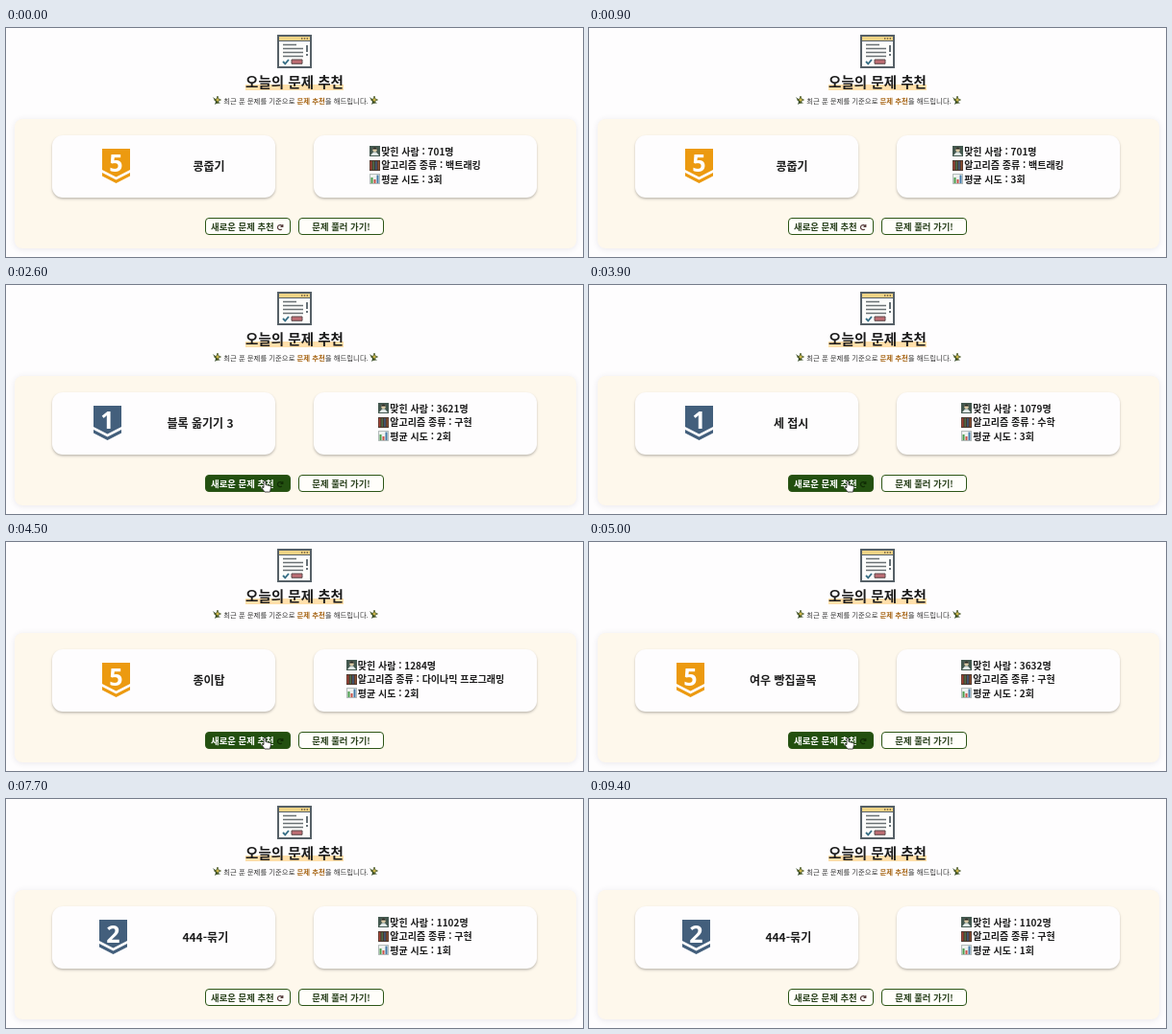
An HTML page that plays this animation: 600x239 px, repeating every 9500 ms.

```html
<!DOCTYPE html>
<html lang="ko">
<head>
<meta charset="utf-8">
<style>
html, body { margin: 0; width: 100%; height: 100%; overflow: hidden; background: #fefdfe; }
body { position: relative; font-family: "Noto Sans CJK KR", "Noto Sans KR", sans-serif; color: #1c1c1c; font-weight: 700; white-space: nowrap; }
body > * { position: absolute; box-sizing: border-box; }
h1 { margin: 0; left: 0; width: 600px; top: 46px; text-align: center; font-size: 14.5px; line-height: 20px; letter-spacing: .05px; }
h1 span { background: linear-gradient(transparent 68%, #ffdfaa 68%, #ffdfaa 97%, transparent 97%); }
#sub { left: 1.5px; width: 600px; top: 70px; text-align: center; font-size: 7.4px; line-height: 11px; font-weight: 500; color: #333; }
#sub b { color: #a9691b; }
#panel { left: 9px; top: 95px; width: 584px; height: 135px; border-radius: 8px; background: #fef8ec; box-shadow: 0 1px 6px rgba(60, 50, 80, .1); }
.card { top: 112px; width: 232px; height: 65px; border-radius: 11px; background: #fefdfe; box-shadow: 0 1.5px 2.5px rgba(0, 0, 0, .25); display: flex; align-items: center; }
#left { left: 48px; padding: 0 20px 2px; justify-content: space-around; font-size: 12px; }
#right { left: 320px; justify-content: center; font-size: 10px; line-height: 14.5px; padding-bottom: 2.5px; }
#right div div { display: flex; align-items: center; }
#right svg { width: 11px; height: 11px; margin-right: 1px; }
.btn { top: 198px; width: 89px; height: 18px; border: 1px solid #2c5516; border-radius: 4px; background: #fffefa; color: #29401c; font-size: 9.4px; line-height: 16px; text-align: center; }
#next { left: 207px; text-align: left; padding-left: 5px; }
#next svg { position: absolute; left: 73px; top: 5px; fill: none; stroke: #553a3a; stroke-width: 1.2; }
#next.hover { background: #235010; color: #fff; }
#next.hover svg { stroke: #102c05; }
#go { left: 304px; }
#pointer { left: 0; top: 0; overflow: visible; fill: #fff; stroke: #222; stroke-width: .8; stroke-linejoin: round; }
</style>
</head>
<body>
<svg style="left:282px;top:7px" width="37" height="36">
  <path d="M1 1H35V34H1Z" fill="#fdfdfb" stroke="#566067" stroke-width="2"/>
  <path d="M2 2H34V6H2Z" fill="#efd385"/>
  <path d="M1 6.5H35" stroke="#566067" stroke-width="1.2"/>
  <path d="M25 4H32" stroke="#6d5a3c" stroke-width="1.4" stroke-dasharray="1.4"/>
  <path d="M6 10.6H20M6 14.6H27M6 18.6H27M6 22.4H27" stroke="#6a7173" stroke-width="1.5"/>
  <path d="M31 11V18M31 20V22" stroke="#4e5a60" stroke-width="1.7"/>
  <path d="M6 28L8.3 30.3L12 26" fill="none" stroke="#386f86" stroke-width="1.9"/>
  <path d="M15 26H26V30.3H15Z" fill="#bd6c72" stroke="#5c4a4c"/>
</svg>
<h1><span>오늘의 문제 추천</span></h1>
<div id="sub">최근 푼 문제를 기준으로 <b>문제 추천</b>을 해드립니다.</div>
<svg style="left:214px;top:71px" width="10" height="10">
  <g id="spark"><path d="M1 1L5 4L9 8L6 7L3 9L4 6Z" fill="#2d4421"/><path d="M6 0L7 3L9.5 4L7 5L6 8L5 5L2.5 4L5 3Z" fill="#c9b44a" stroke="#35491f" stroke-width=".7"/></g>
</svg>
<svg style="left:377px;top:71px" width="10" height="10"><use href="#spark"/></svg>
<div id="panel"></div>
<div class="card" id="left">
  <svg width="29" height="36">
    <path id="badge" d="M0 0H29V22L14.5 29.5L0 22ZM0 25L14.5 32.5L29 25V28.5L14.5 36L0 28.5Z"/>
    <text id="tier" x="14.5" y="23.5" text-anchor="middle" fill="#fff" font-family="Noto Sans, sans-serif" font-size="25" font-weight="800"></text>
  </svg>
  <span id="name"></span>
</div>
<div class="card" id="right"><div>
  <div><svg viewBox="0 0 11 11"><path d="M0 0H11V11H0Z" fill="#43584f"/><circle cx="5.5" cy="4" r="2.4" fill="#d9c9a5"/><path d="M2.7 3.6Q5.5-1 8.3 3.6Z" fill="#272a26"/><path d="M1 10L4 6.5H7L10 10Z" fill="#dfe7e5"/></svg><span id="solved"></span></div>
  <div><svg viewBox="0 0 11 11"><path d="M0 0H11V11H0Z" fill="#49372d"/><path d="M1.5 1V10" stroke="#a64338" stroke-width="1.6"/><path d="M4.2 1V10" stroke="#4d6b45" stroke-width="1.6"/><path d="M6.9 1V10" stroke="#40597a" stroke-width="1.6"/><path d="M9.5 1V10" stroke="#8a4f32" stroke-width="1.6"/></svg><span id="kind"></span></div>
  <div><svg viewBox="0 0 11 11"><path d="M.4.4H10.6V10.6H.4Z" fill="#eef1ef" stroke="#98a4a2" stroke-width=".8"/><path d="M2.5 10V4" stroke="#4a9c4d" stroke-width="2"/><path d="M5.5 10V6" stroke="#c95149" stroke-width="2"/><path d="M8.5 10V1.5" stroke="#437aa8" stroke-width="2"/></svg><span id="tries"></span></div>
</div></div>
<div class="btn" id="next">새로운 문제 추천<svg width="8" height="8"><path d="M5.8 5.8A2.5 2.5 0 1 1 6.2 3M6.8 1V3.3H4.5"/></svg></div>
<div class="btn" id="go">문제 풀러 가기!</div>
<svg id="pointer" width="1" height="1"><path id="shape"/></svg>
<script>
const $ = id => document.getElementById(id);
const LOOP = 9500, GOLD = '#ec9a10', SILVER = '#435f7c';
const ARROW = 'M0 0V7.5L1.8 6L3 8.8L4.3 8.2L3.1 5.5H5.3Z';
const HAND = 'M-1 1Q0-.6 1 1V4.5L5.5 5.6Q6.8 6 6.5 7.5L5.5 12H0L-3.2 7.8Q-3.4 6.2-1 7.5Z';

// start time, badge colour, tier, title, solvers, topic, average tries
const problems = [
  [0, GOLD, 5, '콩줍기', 701, '백트래킹', 3],
  [1800, SILVER, 1, '블록 옮기기 3', 3621, '구현', 2],
  [2900, SILVER, 1, '세 접시', 1079, '수학', 3],
  [4000, GOLD, 5, '종이탑', 1284, '다이나믹 프로그래밍', 2],
  [4700, GOLD, 5, '여우 빵집골목', 3632, '구현', 2],
  [5500, SILVER, 2, '444-묶기', 1102, '구현', 1]
];
// pointer path: time, x, y
const path = [[1200, 264, 229], [1400, 269, 204], [5900, 269, 204], [6200, 261, 230], [6400, 260, 236]];

function pointerAt(t) {
  const i = path.findIndex(p => p[0] > t);
  if (i < 1) return null;
  const [a, b] = [path[i - 1], path[i]];
  const k = (t - a[0]) / (b[0] - a[0]);
  return [a[1] + (b[1] - a[1]) * k, a[2] + (b[2] - a[2]) * k];
}

let shown;
function showProblem(p) {
  if (p === shown) return;
  shown = p;
  const [, color, tier, name, solved, kind, tries] = p;
  $('badge').setAttribute('fill', color);
  $('tier').textContent = tier;
  $('name').textContent = name;
  $('solved').textContent = `맞힌 사람 : ${solved}명`;
  $('kind').textContent = `알고리즘 종류 : ${kind}`;
  $('tries').textContent = `평균 시도 : ${tries}회`;
}

function draw() {
  const t = Math.floor(performance.now() % LOOP / 100) * 100;
  showProblem(problems.filter(p => p[0] <= t).pop());
  const pos = pointerAt(t);
  const hover = !!pos && pos[1] < 216;
  $('next').classList.toggle('hover', hover);
  $('pointer').style.display = pos ? 'block' : 'none';
  if (pos) {
    $('shape').setAttribute('d', hover ? HAND : ARROW);
    $('shape').setAttribute('transform', `translate(${pos})`);
  }
  requestAnimationFrame(draw);
}
draw();
</script>
</body>
</html>
```
